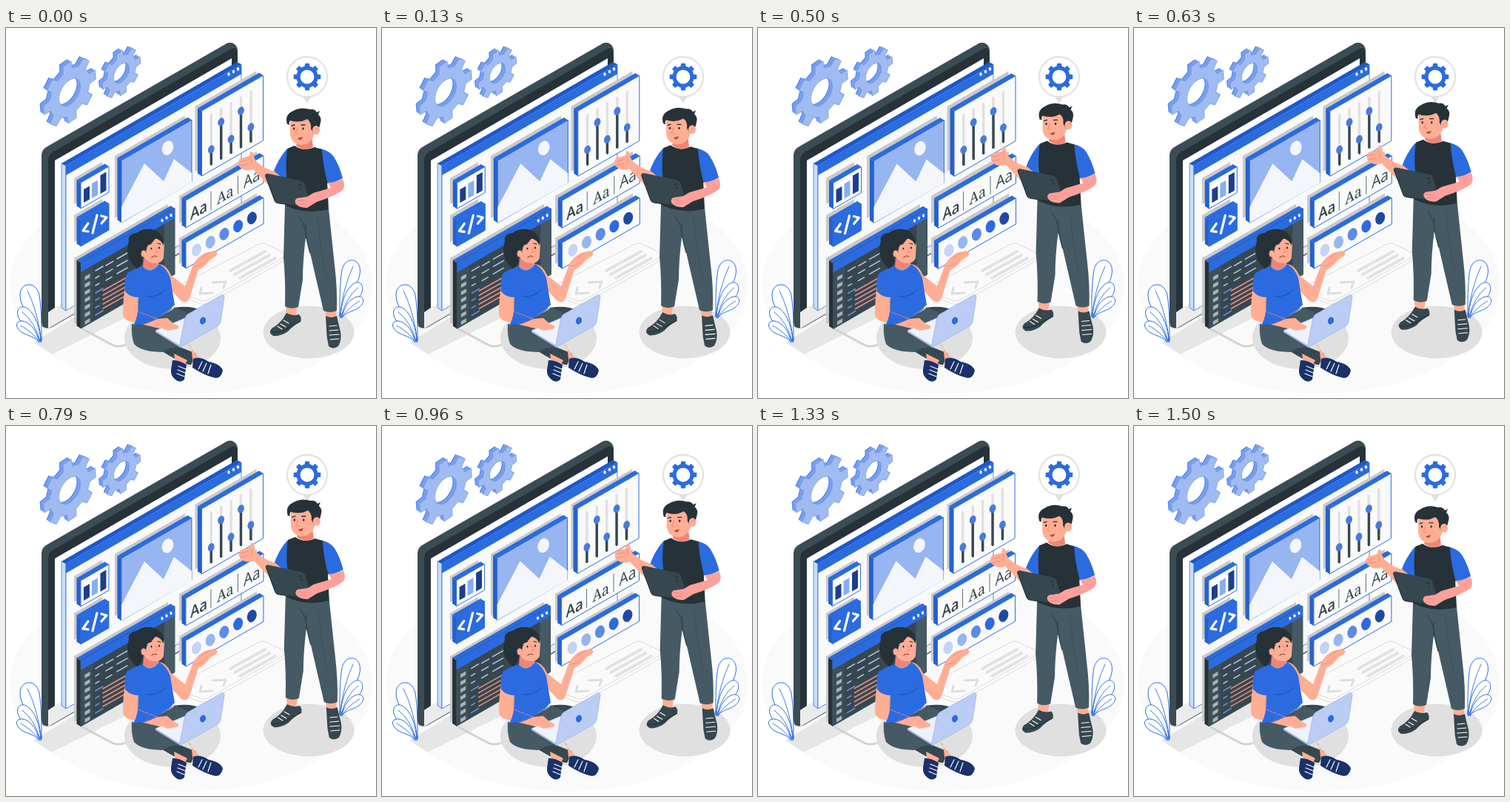
An HTML page for the animation above (1.54 s loop, 500 px wide and 500 px high).

```html
<!DOCTYPE html>
<html lang="en">
<head>
<meta charset="utf-8">
<title>Interface design</title>
<style>
html, body { margin: 0; width: 100%; height: 100%; overflow: hidden; background: #fff; }
svg { display: block; width: 100vw; height: 100vh; }
</style>
</head>
<body>
<svg id="stage" viewBox="0 0 500 500"></svg>
<script>
const LOOP = 1540, K = 0.577;
const BLUE = '#2b6be0', MID = '#97b5f0', NAVY = '#1c3f8c', INK = '#1a3169', DARK = '#263238', SLATE = '#37474f',
      STEEL = '#455a64', GREY = '#e0e0e0', SKIN = '#ffae94', PINK = '#fda09a', SHADE = '#ee8577';

const poly = (pts, fill, extra = '') => `<polygon points="${pts}" fill="${fill}" ${extra}/>`;
const shape = (d, fill, extra = '') => `<path d="${d}" fill="${fill}" ${extra}/>`;
const line = (d, color, w = 1, extra = '') =>
  `<path d="${d}" fill="none" stroke="${color}" stroke-width="${w}" stroke-linecap="round" stroke-linejoin="round" ${extra}/>`;
const oval = (x, y, rx, ry, fill, extra = '') =>
  `<ellipse cx="${x}" cy="${y}" rx="${rx}" ry="${ry}" fill="${fill}" ${extra}/>`;
const tilted = (x, y, rx, ry, fill, angle = 20) => oval(x, y, rx, ry, fill, `transform="rotate(${angle} ${x} ${y})"`);
const iso = (x, y, body) => `<g transform="matrix(.866 -.5 0 1 ${x} ${y})">${body}</g>`;
const slant = (x, y, w, h) => [[x, y], [x + w, y - K * w], [x + w, y - K * w + h], [x, y + h]].join(' ');
const floating = body => `<g class="float">${body}</g>`;

// Raised slab whose front face starts at x, y
function slab(x, y, w, h, face, inner, side = '#2560d0', edge = BLUE) {
  const r = y - K * w, dx = 5.5, dy = 3.5;
  return poly(slant(x - 9, y - 6, w, h), '#c9c9c9') + floating(
    poly([[x, y], [x - dx, y - dy], [x - dx, y + h - dy], [x, y + h]], side) +
    poly([[x, y], [x - dx, y - dy], [x + w - dx, r - dy], [x + w, r]], BLUE) +
    poly(slant(x, y, w, h), face, `stroke="${edge}" stroke-width="1" stroke-linejoin="round"`) + inner);
}

function gearPath(R, r, hole, turn = 0, n = 8) {
  const at = (a, q) => `${(Math.cos(a) * q).toFixed(2)} ${(Math.sin(a) * q).toFixed(2)}`;
  const step = 2 * Math.PI / n;
  let d = '';
  for (let i = 0; i < n; i++) {
    const a = i * step + turn;
    d += [[-.29, r], [-.2, R], [.2, R], [.29, r]]
      .map(([o, q], j) => (i || j ? 'L' : 'M') + at(a + o * step, q)).join('');
  }
  return d + `ZM${hole} 0A${hole} ${hole} 0 1 0 ${-hole} 0A${hole} ${hole} 0 1 0 ${hole} 0Z`;
}

function isoGear(x, y, R) {
  const d = gearPath(R, R * .77, R * .41, -.1), rule = 'fill-rule="evenodd"';
  let out = '';
  for (let k = 5; k > 0; k--) out += iso(x - k, y - k * .6, shape(d, k === 5 ? '#4d80e4' : '#7a9fec', rule));
  return out + iso(x, y, shape(d, '#a0bbf2', `${rule} stroke="#5f8de7" stroke-width=".6"`));
}

function plant(x, y, flip) {
  const leaf = d => shape(d, '#fff', `stroke="${BLUE}" stroke-width="1"`);
  return `<g transform="translate(${x} ${y}) scale(${flip} 1)">` +
    leaf('M-1 0C-3-22-30-40-30-62C-30-80-8-82-4-62C-1-44-1-20-1 0Z') +
    leaf('M-2 2C-6-12-18-16-30-28C-38-40-31-51-20-44C-9-36-3-18-2 2Z') +
    leaf('M-4 2C-9-6-18-6-28-12C-37-18-37-28-26-27C-14-24-7-12-4 2Z') +
    line('M-1 0Q-6-40-20-68M-3 0Q-10-26-27-39M-4 1Q-13-12-29-21', BLUE, .9) + '</g>';
}

function floor() {
  const pad = 'M226 352L340 293Q348 289 354 293L376 304Q380 307 375 310L276 366Q268 371 260 367L227 356Z';
  return oval(250, 348, 245, 146, '#fafafa') +
    poly('37,425 100,386 175,360 205,370 62,441', '#e6e6e6') +
    line('M104 407L143 428Q153 433 166 426', '#d2d2d2', 3) +
    shape(pad, '#fafafa', 'stroke="#dcdcdc"') +
    line('M227 356V360L261 372Q268 375 276 371L376 314', '#dcdcdc', 1) +
    line('M303 328L350 302M309 333L356 307M316 338L364 311', '#e2e2e2', 4) +
    line('M279 344L297 343L294 351M264 351L262 359L279 358', '#dedede', 3) +
    oval(225, 419, 65, 42, GREY) + oval(409, 411, 61.5, 35.5, GREY);
}

function monitor() {
  return shape('M48 172Q48 164 56 160L298 21Q304 18 309 22Q313 25 313 32V260L66 402Q56 409 50 404Q48 402 48 396Z', '#3b4c55') +
    shape('M57 179Q57 171 64 167L303 29Q312 24 313 33V255L60 402Q57 404 57 396Z', DARK) +
    poly('66,179 305,41 305,245 66,383', '#fff') +
    poly('57,384 66,378 305,240 305,263 57,406', '#ececec') +
    line('M52 405Q56 408 62 403L100 381', '#cfcfcf', 1) +
    poly('75,183 81,186 81,382 75,378', '#cbdaf8', `stroke="${BLUE}" stroke-width=".7"`) +
    poly('75,183 312,46 318,49 81,186', '#1f58c6') +
    poly(slant(81, 186, 237, 196), '#f9f9f9', `stroke="${BLUE}" stroke-width=".8"`) +
    poly(slant(81, 186, 237, 13), BLUE) +
    [[301, 62.5], [307.5, 59], [313.5, 55.5]].map(([x, y]) => oval(x, y, 1.7, 2.3, '#fff')).join('');
}

function cards() {
  const bars = [[105, 218, 18, NAVY], [116, 210, 20, '#8aadf0'], [127.5, 199, 25, NAVY]]
    .map(([x, y, h, c]) => poly(slant(x, y, 8, h), c)).join('');
  const code = line('M111 264L104 274L111 275M129 254L136 256L129 264', '#fff', 3.2) +
    line('M123 253L117 277', '#fff', 3.2);
  const picture = poly('156,242 187,183 213,207 227,177 251,196 251,209 156,263', '#f4f6fc') +
    tilted(218.5, 162, 7.5, 10, '#f4f6fc');
  const knobs = [164, 127, 150, 112, 134].map((y, i) => {
    const x = 277.3 + i * 13.4, end = 184 - i * 7.7;
    return line(`M${x} ${end - 67}V${end}`, GREY, 3.4) + line(`M${x} ${y}V${end}`, SLATE, 3.4) +
      tilted(x, y, 4.2, 5.8, '#4a79dc');
  }).join('');
  const word = (x, y, font, weight, size) => iso(x, y,
    `<text font-family="${font}" font-weight="${weight}" font-size="${size}" fill="${SLATE}">Aa</text>`);
  const words = word(249, 260, 'Open Sans, sans-serif', 600, 21.5) + word(285, 239, 'Noto Serif, serif', 400, 20.5) +
    word(321, 217, 'Open Sans, sans-serif', 400, 22) + line('M277 221V246M313.5 200V224', '#53616a', .9);
  const dots = ['#c3d4f7', '#97b5f0', '#5c8ae6', BLUE, '#1e4aa0']
    .map((c, i) => tilted(257.5 + i * 18.7, 300 - i * 10.8, 6.2, 8.7, c)).join('');
  return slab(156, 179, 95, 84, MID, picture) +
    slab(101, 209, 38, 35, '#fff', bars) +
    slab(101, 259, 38, 36, BLUE, code) +
    slab(264.5, 112, 83, 88, '#fafafa', knobs) +
    slab(243, 233, 105, 37, '#fafafa', words) +
    slab(243, 290, 105, 35, '#fafafa', dots);
}

function editor() {
  let rows = '';
  for (let i = 0; i < 7; i++) {
    const y = 336 + i * 10;
    rows += poly(slant(106.5, y, 7, 5), '#a8b4ba');
    rows += line(`M121 ${y - 8}l${i % 3 ? 5 : 10} ${i % 3 ? -3 : -6}`, i > 2 ? '#6c96e8' : '#b7c9ed', 1.5);
    if (i < 3) rows += line(`M135 ${y - 15}l${10 - i} ${-5.8 + i * .6}M150 ${y - 24}l14 -8`, '#b8c9ea', 1.5);
  }
  for (let i = 0; i < 5; i++) rows += line(`M131 ${355 + i * 6}l32 -18`, '#e88d87', 1.6);
  const lights = [[211, 260], [217, 256.5], [223, 253]].map(([x, y]) => oval(x, y, 1.6, 2.2, '#fff')).join('');
  return slab(101, 317, 127, 89, SLATE,
    poly(slant(101, 317, 16, 89), '#3e4f58') + poly(slant(214, 251.8, 14, 89), STEEL) +
    poly(slant(101, 317, 127, 13), BLUE) + rows + lights, DARK, SLATE);
}

function womanHead() {
  return shape('M166 288Q164 279 176 277Q187 269 201 273Q213 278 213 291L186 309Q184 321 177 325Q170 320 166 311Q162 300 166 288Z', DARK) +
    shape('M187 296Q189 286 201 285Q213 284 214 292L213 311Q209 319 201 318Q190 317 186 309Z', SKIN) +
    shape('M184 309Q180 292 187 282Q200 272 211 283Q214 288 213 294Q209 286 202 284Q198 291 192 293Q189 299 189 307Z', DARK) +
    oval(186, 305, 3.4, 4.5, SKIN) + oval(196.5, 298, 1.1, 1.6, DARK) + oval(207, 297, 1.1, 1.6, DARK) +
    line('M192 293L197 291M205 291L209 292', DARK, 1.2) + line('M202 297L205 303L201 304', SHADE, .9) +
    line('M197 310Q200 307 204 309', '#a84e4e', 1.2) + line('M186 310V312', BLUE, 1.5);
}

function woman() {
  return shape('M227 378Q249 374 265 382L250 398L218 397Z', SLATE) +
    shape('M207 319Q217 320 223 334L242 349L253 319Q259 309 269 304L281 301Q288 303 284 308L276 313Q269 323 260 327L248 365Q244 374 236 368L212 341Z', SKIN) +
    line('M255 322Q266 322 272 311M264 311L274 304', SHADE, .8) +
    shape('M170 400Q191 402 229 378L258 390L235 431L257 440L250 455Q241 455 213 438Q183 438 173 427Q169 416 170 400Z', STEEL) +
    shape('M213 438Q226 427 241 434L257 440L250 455Q241 455 213 438Z', SLATE) +
    shape('M227 440L245 449L241 457L229 453ZM250 430L245 427L258 442L266 451L253 455Z', SKIN) +
    shape('M225 449Q233 448 244 455Q242 466 241 475Q236 480 230 476Q222 470 223 462Z', INK) +
    shape('M253 447Q262 443 274 451Q290 454 293 463Q291 473 283 473Q269 470 252 459Z', INK) +
    line('M233 457L243 461M232 462L242 466M231 467L241 471M265 451L260 461M271 453L266 464M277 455L273 467', '#fff', 1.2) +
    shape('M186 309L205 313L207 322Q199 335 185 323Z', SHADE) +
    shape('M161 348Q158 366 158 383Q157 393 166 396L207 406L223 409L234 405Q236 401 227 400L218 392L205 393L178 383L181 350Z', SKIN) +
    shape('M164 331Q174 325 185 322Q195 334 207 319Q217 324 222 338L228 374Q204 398 172 402Q177 393 178 383L179 364Q168 364 161 356Q159 338 164 331Z', BLUE) +
    line('M177 402Q204 397 224 379M190 363Q207 364 216 353', '#1d4fb4', 1) +
    line('M185 322Q195 334 207 319', '#8aadf0', 1) +
    line('M178 366L178 383L204 393M216 398L230 401', SHADE, .8) +
    womanHead() +
    poly('202,409 242,392 236,430', '#eef2fb', 'stroke="#c4d1ec" stroke-width=".8"') +
    poly('202,409 236,430 236,432 202,411', '#aebde0') +
    shape('M205 403L221 397L232 402Q236 406 230 407L218 409Z', SKIN) +
    shape('M242 392Q243 388 247 386L291 361Q295 359 295 364L290 397Q289 401 286 403L238 430Q234 432 235 427Z', '#bccdf5', 'stroke="#9ab6ec" stroke-width=".8"') +
    tilted(266, 395.5, 4, 5, BLUE);
}

function manHead() {
  return shape('M395 148L413 145L415 161Q403 168 392 159Z', SHADE) +
    shape('M384 124Q394 117 414 124L417 142Q413 158 398 158Q385 156 384 143Z', SKIN) +
    shape('M380 130Q376 117 388 112Q398 106 411 110Q417 109 420 114L424 112L422 117Q427 121 425 128Q423 140 416 143L412 136Q413 127 407 123Q397 129 384 125Q382 127 383 131Z', DARK) +
    oval(419, 138, 5, 6, SKIN) + line('M418 138Q419 135 422 136', SHADE, .9) +
    oval(389, 136, 1.2, 1.7, DARK) + oval(401.5, 136, 1.2, 1.7, DARK) +
    line('M386 132L390 131M399 131L404 131', DARK, 1.3) +
    line('M394 136L391 143L395 144', SHADE, 1) + shape('M394 149L401 147Q400 152 396 151Z', '#a84e4e');
}

function man() {
  return shape('M378 373L394 375L391 391L379 389ZM430 378L446 380L446 395L433 393Z', SKIN) +
    shape('M379 385Q388 390 396 387Q400 391 398 397Q388 402 381 410Q371 417 361 416Q354 412 359 406Q372 399 379 385Z', SLATE) +
    line('M358 411Q372 413 383 404L398 396', DARK, 1.2) +
    line('M375 395L382 399M371 400L378 404M367 403L373 407', '#fff', 1.1) +
    shape('M432 389Q439 393 447 389Q449 399 452 410Q454 422 449 430Q442 435 436 430Q433 418 433 407Z', SLATE) +
    line('M437 403L447 402M437 409L449 408M437 415L450 414M438 421L450 420', '#fff', 1.1) +
    shape('M377 238L436 244Q441 292 444 320Q448 353 447 382Q438 386 429 382L411 304L405 283Q401 315 401 340L395 377Q385 381 377 376Q378 342 375 310Z', STEEL) +
    line('M405 283Q406 267 396 256M411 304Q404 280 405 265', SLATE, 1.5) +
    line('M421 256Q425 302 433 338', '#3c5059', 1) +
    shape('M379 164Q367 178 361 196Q370 204 380 206L392 166Z', BLUE) +
    shape('M424 163Q438 166 443 174Q451 187 455 203Q445 209 434 210L420 180Z', BLUE) +
    shape('M390 159Q402 168 417 161L427 164Q428 184 434 207L436 245Q406 253 378 240L380 208Q377 187 380 163Z', DARK) +
    manHead() +
    shape('M363 194Q350 191 338 180L335 174Q335 166 330 167L329 173L317 176Q312 180 315 187L320 191Q327 194 334 191L355 213L374 208L374 203Z', SKIN) +
    line('M317 181L327 178M317 186L327 184M329 174Q334 178 331 184', SHADE, .9) +
    shape('M350 200Q350 196 355 197L398 206Q402 207 403 210L411 235Q412 243 405 242L368 237Q363 236 362 232Z', SLATE) +
    line('M351 200L363 233Q364 237 369 237L405 242', DARK, 1) +
    oval(397, 212, 1.4, 1.4, DARK) + oval(398.5, 217, 1.2, 1.2, DARK) +
    shape('M435 209Q445 209 455 204Q459 213 455 219Q445 227 420 235L407 243Q397 243 393 239Q388 234 393 230L407 228L415 223L439 216Z', PINK) +
    line('M394 233L405 234M395 238L405 238', SHADE, .8);
}

function bubble() {
  return poly('401,92 413,92 407,102', GREY) +
    oval(407, 66, 27, 27, '#fff', `stroke="${GREY}" stroke-width="2"`) +
    `<g transform="translate(407 66)">${shape(gearPath(18.5, 14.8, 9.4), BLUE, 'fill-rule="evenodd"')}</g>`;
}

const stage = document.getElementById('stage');
stage.innerHTML = floor() + plant(49, 423, 1) + plant(450, 390, -.95) + isoGear(86, 87, 41) + isoGear(156, 61, 30) +
  monitor() + cards() + editor() + woman() + bubble() + `<g id="man">${man()}</g>`;

const figure = document.getElementById('man');
const floats = stage.querySelectorAll('.float');

function draw(now) {
  const a = 2 * Math.PI * (now % LOOP) / LOOP;
  const lift = (1 - Math.cos(a)) / 2, drift = .6 * Math.sin(a);
  figure.setAttribute('transform', `translate(${(.8 * lift).toFixed(3)} ${(-9 * lift).toFixed(3)})`);
  for (const f of floats) f.setAttribute('transform', `translate(${drift.toFixed(3)} ${drift.toFixed(3)})`);
}

const start = performance.now();
function tick() {
  draw(performance.now() - start);
  requestAnimationFrame(tick);
}
tick();
</script>
</body>
</html>
```
